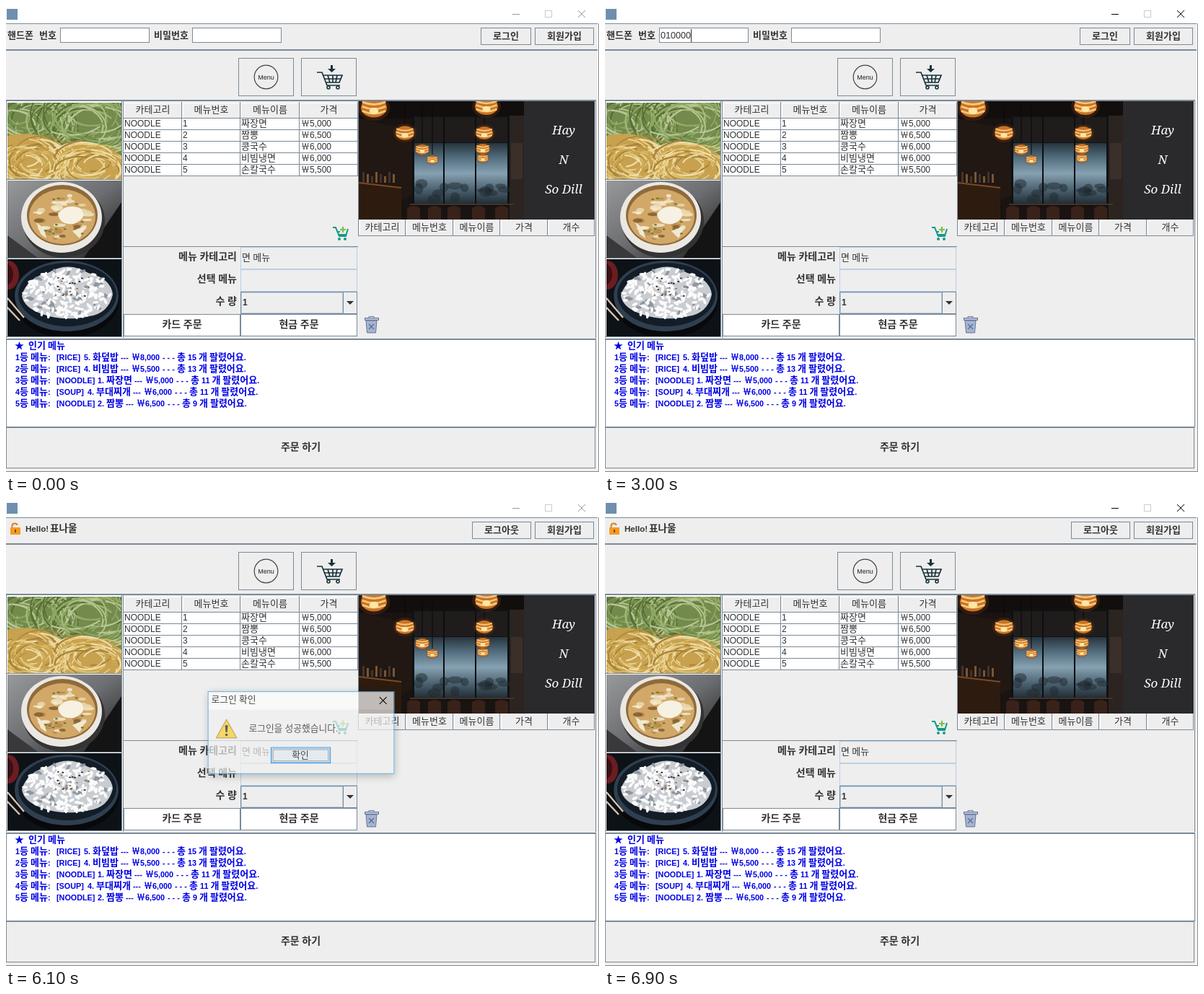
These frames come from a looping animation (822 px wide and 646 px high, 8000 ms). An HTML page:

```html
<!DOCTYPE html>
<html lang="ko">
<head>
<meta charset="utf-8">
<title>Order window</title>
<style>
html, body { margin: 0; width: 100%; height: 100%; overflow: hidden; background: #eee; }
svg { display: block; width: 822px; height: 646px; }
text { font-family: "Liberation Sans", "Noto Sans CJK KR", "Noto Sans CJK", sans-serif; white-space: pre; }
.ko { font-family: "Noto Sans CJK KR", "Noto Sans CJK", sans-serif; }
.script { font: italic 17px "Noto Serif", serif; fill: #fff; text-anchor: middle; }
</style>
</head>
<body>
<svg id="stage" viewBox="0 0 822 646" xmlns="http://www.w3.org/2000/svg"></svg>
<script>
const EDGE = '#7a8a99', INK = '#333', LOOP = 8000;
const PHONE = '01000002746', USER = '표나울';

let seed = 7;
const rnd = (a = 0, b = 1) => {
  seed = (seed * 16807) % 2147483647;
  return a + (b - a) * seed / 2147483647;
};
const pick = list => list[Math.floor(rnd(0, list.length))];
const many = (n, f) => Array.from({ length: n }, (_, i) => f(i)).join('');

// Rectangle given by its outer pixel edges
function box(x, y, x2, y2, fill = '#eee', stroke = '') {
  const o = stroke ? 0.5 : 0;
  return `<rect x="${x + o}" y="${y + o}" width="${x2 - x - 2 * o}" height="${y2 - y - 2 * o}" fill="${fill}"${stroke ? ` stroke="${stroke}"` : ''}/>`;
}
const oval = (x, y, rx, ry, fill, more = '') =>
  `<ellipse cx="${x}" cy="${y}" rx="${rx}" ry="${ry}" fill="${fill}" ${more}/>`;
const path = (d, fill, stroke = 'none', w = 1, more = '') =>
  `<path d="${d}" fill="${fill}" stroke="${stroke}" stroke-width="${w}" ${more}/>`;
const line = (d, stroke, w = 1, more = '') => path(d, 'none', stroke, w, more);
const clip = (id, x, y, x2, y2, body) =>
  `<clipPath id="${id}">${box(x, y, x2, y2)}</clipPath><g clip-path="url(#${id})">${body}</g>`;
const fade = (id, x2, y2, ...colors) =>
  `<linearGradient id="${id}" x2="${x2}" y2="${y2}">` +
  colors.map((c, i) => `<stop offset="${i / (colors.length - 1)}" stop-color="${c}"/>`).join('') + `</linearGradient>`;

// Hangul runs get their own size; Latin runs are a little smaller
function label(x, y, str, { size = 13, latin = size - 1, bold = false, fill = INK, at = 'start' } = {}) {
  const runs = str.replace(/[가-힣￦★]+/g, s => `<tspan class="ko" font-size="${s === '￦' ? 12 : size}">${s}</tspan>`);
  return `<text x="${x}" y="${y}" font-size="${latin}" fill="${fill}" text-anchor="${at}"${bold ? ' font-weight="700"' : ''}>${runs}</text>`;
}
const button = (x, y, x2, y2, str, size = 13, fill = '#eee') =>
  box(x, y, x2, y2, fill, EDGE) +
  label((x + x2) / 2, Math.floor((y + y2) / 2) + 4, str, { size, bold: true, at: 'middle' });

function heads(xs, y, y2, names) {
  return names.map((n, i) =>
    box(xs[i], y, xs[i + 1], y2) +
    line(`M${xs[i] + 1.5} ${y2 - 1}V${y + 1.5}H${xs[i + 1] - 1}`, '#fff') +
    line(`M${xs[i]} ${y2 - .5}H${xs[i + 1] - .5}V${y}`, EDGE) +
    label((xs[i] + xs[i + 1]) / 2, Math.floor((y + y2) / 2) + 4, n, { at: 'middle' })).join('');
}

function noodles() {
  // Loose strands: arcs of ellipses whose centres wander around the nest
  const nest = (cx, cy, rx, ry, n, colors) => many(n, () => {
    const k = rnd(.45, 1.1), a = rnd(0, 6.3), b = a + rnd(.9, 2);
    const x = cx + rnd(-.35, .35) * rx, y = cy + rnd(-.35, .35) * ry;
    const p = t => `${(x + rx * k * Math.cos(t)).toFixed(1)} ${(y + ry * k * Math.sin(t)).toFixed(1)}`;
    return line(`M${p(a)}A${(rx * k).toFixed(1)} ${(ry * k).toFixed(1)} 0 0 1 ${p(b)}`, pick(colors), rnd(1.3, 2.4).toFixed(1));
  });
  const green = ['#8fa864', '#a9bb7c', '#768f4c', '#566f36', '#b9c795'];
  const yellow = ['#dcbd68', '#ead291', '#c9a44e', '#f0de a6'.replace(' ', ''), '#a98439'];
  return box(2, 134, 160, 240, '#738a4c') +
    nest(28, 156, 60, 42, 90, green) + nest(112, 160, 76, 50, 130, green) +
    path('M2 180C26 174 58 178 76 194C100 182 140 190 160 208V240H2Z', '#c7a14f') +
    clip('dough', 2, 178, 160, 240, nest(36, 216, 46, 30, 80, yellow) + nest(118, 224, 48, 28, 80, yellow));
}

function soup() {
  return fade('slab', 1, 1, '#98999b', '#6c6d70', '#1a1a1b') + box(2, 242, 160, 349, 'url(#slab)') +
    path('M160 272L108 349H160Z', '#141414') + path('M2 318L44 349H2Z', '#39393b') +
    oval(80, 298, 57, 51, '#333334') + oval(77, 293, 56, 49, '#ebe8e3') +
    oval(78, 290, 49, 42, '#8f6a3a') + oval(78, 292, 46, 38, '#d2a868') +
    many(46, () => {
      const a = rnd(0, 6.3), d = Math.sqrt(rnd(0, .85));
      return oval(78 + 40 * d * Math.cos(a), 292 + 33 * d * Math.sin(a), rnd(3, 9), rnd(1.5, 4),
        pick(['#f3e9cc', '#eadbb2', '#b98a4c', '#805a30', '#f6efdc']), 'opacity=".85"');
    }) +
    path('M72 288Q84 272 104 281Q114 294 94 302Q74 304 72 288Z', '#f7f1e3') +
    path('M42 300Q54 307 56 322L48 316ZM92 312L112 304L102 322Z', '#f1e8d0') +
    many(12, () => oval(rnd(50, 108), rnd(266, 318), 2, 1.3, '#6d7d30'));
}

function rice() {
  return box(2, 351, 160, 458, '#0d1217') +
    oval(3, 373, 15, 20, '#6b1d22') + oval(0, 372, 10, 15, '#391013') +
    oval(84, 407, 73, 53, '#07090c') + oval(84, 402, 72, 49, '#2f3f50') + oval(85, 400, 68, 44, '#131d27') +
    path('M22 401Q30 376 58 370Q86 353 114 370Q146 378 148 400Q142 426 116 430Q80 438 50 427Q24 418 22 401Z', '#c9ccd1') +
    many(200, () => {
      const a = rnd(0, 6.3), d = Math.sqrt(rnd());
      const x = (85 + 60 * d * Math.cos(a)).toFixed(1), y = (399 + 34 * d * Math.sin(a)).toFixed(1);
      return oval(x, y, 4, 1.9, rnd() < .84 ? '#fbfbfb' : '#8f969f', `transform="rotate(${rnd(0, 180).toFixed()} ${x} ${y})"`);
    }) +
    many(20, () => oval(rnd(68, 118), rnd(373, 402), 1.5, .9, pick(['#9a6935', '#2a2420']))) +
    line('M2 405L25 432M2 418L19 436', '#d9c3ad', 2.4);
}

function cafe() {
  const lamp = (x, y, r) => oval(x, y, r * 1.25, r, '#8a3f0c', 'opacity=".25"') +
    oval(x, y, r, r * .75, '#c87428') +
    [-.45, -.1, .25].map(k => line(`M${x - r * .9} ${y + k * r}Q${x} ${y + k * r + r * .4} ${x + r * .9} ${y + k * r}`, '#f9c778', r * .16)).join('') +
    oval(x, y + r * .25, r * .35, r * .25, '#ffe6a5');
  const seat = x => path(`M${x} 296V280Q${x + 9} 274 ${x + 18} 280V296Z`, '#38221a');
  return fade('glass', 0, 1, '#26343d', '#546f80', '#86a1b1', '#4f6675', '#222d35') +
    box(489, 132, 718, 296, '#191312') + box(489, 132, 718, 156, '#120e0d') +
    path('M489 156L564 172V262L489 296Z', '#211713') +
    box(563, 152, 698, 278, '#0e1215') + box(566, 190, 695, 274, 'url(#glass)') +
    many(14, () => oval(rnd(570, 692), rnd(246, 268), rnd(5, 12), rnd(3, 8), '#1d272e', 'opacity=".5"')) +
    box(566, 154, 695, 189, '#1f1c1b') + box(606, 154, 608, 276, '#0d0e10') + box(650, 154, 652, 276, '#0d0e10') +
    box(698, 152, 718, 296, '#2b2421') + box(700, 190, 716, 240, '#3a2f29') +
    path('M489 244L548 252V296H489Z', '#2e1b10') + line('M489 245L548 252', '#7a4a24', 2) +
    many(8, i => box(494 + i * 6, 230 + i % 3 * 3, 497 + i * 6, 245, i % 2 ? '#7a5533' : '#43342a')) +
    [556, 585, 612, 646, 678].map(seat).join('') + line('M560 275H704', '#4a3120', 2) +
    line('M553 132V166M577 132V190M591 132V206M663 132V166M661 180V210', '#0a0808') +
    lamp(510, 141, 18) + lamp(666, 139, 16) + lamp(553, 176, 13) + lamp(663, 176, 12) +
    lamp(577, 199, 9.5) + lamp(591, 213, 7.5) + lamp(661, 198, 9.5) + lamp(661, 211, 7.5) +
    box(718, 132, 816, 296, '#2a292b') +
    [['Hay', 178], ['N', 219], ['So Dill', 260]].map(([s, y]) => `<text class="script" x="773" y="${y}">${s}</text>`).join('');
}

function icons() {
  const teal = '#18333a', green = '#159a88';
  return oval(360.5, 98.5, 16.3, 16.3, 'none', 'stroke="#444" stroke-width="1.2"') +
    `<text x="360.5" y="102" font-size="9" fill="#222" text-anchor="middle">Menu</text>` +
    line('M431 92H438L445 110H463M439 96H466L462 106H444M441 101H464M446 96L449 106M453 96V106M459 96L457 106', teal, 1.7) +
    oval(447, 113, 2, 2, 'none', `stroke="${teal}" stroke-width="1.6"`) +
    oval(460, 113, 2, 2, 'none', `stroke="${teal}" stroke-width="1.6"`) +
    path('M450 82H453V87H457L451.5 92L446 87H450Z', teal) +
    line('M453 307H457L462 319H471L474 309M459 313H463M460 317H471', green, 2) +
    oval(462, 323, 2, 2, green) + oval(470, 323, 2, 2, green) +
    line('M467 306V314M463 310H471', '#7cc142', 2.2) +
    path('M499 436H514L512.5 453H500.5Z', '#a7b4cf', '#66759a') +
    box(497, 432, 517, 436, '#b8c3d9', '#66759a') + line('M503 432V430.5H510V432', '#66759a') +
    line('M503 441L510 448M510 441L503 448', '#53719f', 1.4);
}

function table() {
  const xs = [163, 244, 325, 407, 488];
  const rows = [['짜장면', '5,000'], ['짬뽕', '6,500'], ['콩국수', '6,000'], ['비빔냉면', '6,000'], ['손칼국수', '5,500']];
  return box(162, 155, 488, 236, '#fff') +
    heads(xs, 133, 156, ['카테고리', '메뉴번호', '메뉴이름', '가격']) +
    rows.map(([name, cost], i) => {
      const y = 167 + i * 16;
      return label(164, y, 'NOODLE') + label(245, y, `${i + 1}`) + label(326, y, name) +
        label(409, y, '￦' + cost) + line(`M163 ${y + 4.5}H488`, EDGE);
    }).join('') + line('M162.5 133V236M243.5 155V236M324.5 155V236M406.5 155V236M487.5 133V236', EDGE);
}

function form() {
  const tag = (y, s) => label(320, y, s, { size: 14, bold: true, at: 'end' });
  return line('M162 333.5H488M162.5 132V460', EDGE) +
    tag(352, '메뉴 카테고리') + tag(383, '선택 메뉴') + tag(414, '수 량') +
    box(325, 334, 487, 365, '#eee', '#b8cfe5') + box(325, 365, 487, 396, '#eee', '#b8cfe5') +
    label(327, 353, '면 메뉴') +
    box(325, 396, 487, 427, '#eee', EDGE) + box(326, 397, 467, 426, 'none', '#b8cfe5') + box(467, 396, 487, 427, '#eee', EDGE) +
    path('M472 409H482L477 414Z', INK) + label(328, 415, '1', { bold: true }) +
    button(163, 427, 325, 458, '카드 주문', 14, '#fff') + button(325, 427, 487, 458, '현금 주문', 14, '#fff');
}

function ranking() {
  const style = { size: 13, latin: 10.8, bold: true, fill: '#0000e6' };
  const rows = [['RICE', 108, '5', '화덮밥', '8,000', 15], ['RICE', 108, '4', '비빔밥', '5,500', 13],
    ['NOODLE', 127, '1', '짜장면', '5,000', 11], ['SOUP', 113, '4', '부대찌개', '6,000', 11], ['NOODLE', 127, '2', '짬뽕', '6,500', 9]];
  return box(0, 462, 818, 584, '#fff', EDGE) +
    label(12, 475, '★', style) + label(31, 475, '인기 메뉴', style) +
    rows.map(([kind, x, no, name, cost, sold], i) => {
      const y = 491 + i * 16, end = x + 15 + 12 * name.length;
      return [[13, `${i + 1}등 메뉴:`], [70, `[${kind}]`], [x, `${no}. ${name}`], [end, '---'], [end + 15, '￦' + cost],
        [end + 58, '- - -'], [end + 78, `총 ${sold} 개 팔렸어요.`]].map(([px, s]) => label(px, y, s, style)).join('');
    }).join('');
}

function dialog() {
  return `<g id="dialog">` + `<rect x="279" y="267" width="262" height="117" fill="#000" opacity=".35" filter="url(#soft)"/>` +
    box(277, 264, 541, 381, '#f0f0f0') + box(278, 265, 540, 290, '#fff') + box(277, 264, 541, 381, 'none', '#2a94dc') +
    label(282, 280, '로그인 확인', { fill: '#000' }) + line('M520 272L530 282M530 272L520 282', '#000', 1.1) +
    path('M303.5 304L318 330H289Z', '#f9cf2b', '#b99a3c', 1.5, 'stroke-linejoin="round"') +
    path('M301.5 312H305.5L304.6 322H302.4Z', '#222') + oval(303.5, 325.5, 1.8, 1.8, '#222') +
    label(335, 321, '로그인을 성공했습니다.', { fill: '#222' }) +
    `<g id="okay">${box(366, 343, 451, 366, '#e1eaf2', '#0078d7')}</g>` + box(367, 344, 450, 365, 'none', '#5aa9e6') +
    `<rect x="369.5" y="346.5" width="78" height="16" fill="none" stroke="#222" stroke-dasharray="1 1"/>` +
    label(408, 359, '확인', { fill: '#000', at: 'middle' }) + `</g>`;
}

const field = x => box(x, 30, x + 124, 51, '#fff', EDGE);

document.getElementById('stage').innerHTML =
  `<filter id="soft" x="-20%" y="-20%" width="140%" height="150%"><feGaussianBlur stdDeviation="6"/></filter>` +
  box(0, 0, 822, 646) + box(0, 0, 822, 24, '#fff') + box(1, 4, 16, 19, '#6f8fae') +
  `<g id="frame" stroke="#000" fill="none"><path d="M702 11.5H712M793 6L803 16M803 6L793 16"/></g>` +
  box(747, 6, 757, 16, 'none', '#ccc') +
  line('M0 24.5H820M0 60.5H820M0 61.5H820M0 130.5H818M0 131.5H818M0 461.5H818M817.5 132V460', EDGE) +
  box(820, 24, 821, 645, '#fff') + line('M821.5 24V645M0 645.5H822', '#888') +
  `<g id="login">` +
    label(2, 45, '핸드폰', { bold: true }) + label(46, 45, '번호', { bold: true }) + field(75) +
    label(205, 45, '비밀번호', { bold: true }) + field(258) +
    `<text id="phone" x="77" y="45" font-size="12.6" fill="${INK}"></text>` +
    `<g id="dots">${many(4, i => oval(263 + 6 * i, 41, 1.9, 1.9, INK))}</g>` +
    `<rect id="caret" y="32" width="1" height="18" fill="${INK}"/>` +
    button(658, 30, 728, 54, '로그인') + `<g id="hover">${box(659, 31, 727, 53, 'none', '#9fbfdf')}${box(660, 32, 726, 52, 'none', '#b8cfe5')}</g>` +
  `</g><g id="hello">` +
    line('M8.5 40V36Q8.5 32.5 12 32.5T15.5 35', '#d8801c', 2) + box(6, 38, 20, 48, '#f59a23') + box(12, 41, 14, 45, '#7a4a10') +
    label(27, 44, 'Hello!', { latin: 11.6, bold: true }) + label(61, 44, USER, { size: 13.6, bold: true }) +
    button(646, 30, 728, 54, '로그아웃') +
  `</g>` + button(733, 30, 815, 54, '회원가입') +
  box(322, 72, 399, 125, '#eee', EDGE) + box(409, 72, 486, 125, '#eee', EDGE) +
  box(0, 132, 162, 460, '#fff') + line('M.5 132V460M160.5 132V459M0 240.5H161M0 349.5H161M0 458.5H161', EDGE) +
  clip('pic1', 2, 134, 160, 240, noodles()) + clip('pic2', 2, 242, 160, 349, soup()) + clip('pic3', 2, 351, 160, 458, rice()) +
  table() + form() + clip('pic4', 489, 132, 816, 296, cafe()) +
  heads([489, 554, 620, 685, 751, 816], 296, 319, ['카테고리', '메뉴번호', '메뉴이름', '가격', '개수']) + line('M488.5 132V319', EDGE) +
  icons() + ranking() + button(0, 584, 817, 641, '주문 하기', 14) + dialog();

const $ = id => document.getElementById(id);
const show = (id, on) => $(id).setAttribute('visibility', on ? 'visible' : 'hidden');
const count = (times, t) => times.filter(k => t >= k).length;

const KEYS = [1900, 2000, 2200, 2700, 2800, 3000, 3100, 3400, 3500, 3600, 3800];
const DOTS = [4400, 4500, 4600, 4600];
// time, opacity, scale
const FADE = [[0, 0, 1], [6100, .7, .98], [6200, .93, .995], [6300, 1, 1], [6700, .75, .985], [6800, .3, .95], [6900, 0, 1]];

function draw(now) {
  const t = now % LOOP, logged = t >= 6100;
  const typed = count(KEYS, t), dots = count(DOTS, t);
  const active = (t >= 800 && t < 6100) || t >= 6700;
  $('frame').setAttribute('stroke', active ? '#000' : '#999');
  $('phone').textContent = PHONE.slice(0, typed);
  [...$('dots').children].forEach((d, i) => d.setAttribute('opacity', i < dots ? 1 : 0));
  const blink = (t >= 1300 && t < 1700) || (t >= 5100 && t < 5600);
  $('caret').setAttribute('x', t < 4100 ? 77 + 7 * typed : 260 + 6 * dots);
  $('caret').setAttribute('opacity', t >= 800 && !blink ? 1 : 0);
  $('hover').setAttribute('opacity', t >= 5700 ? 1 : 0);
  show('login', !logged);
  show('hello', logged);

  const [, alpha, k] = FADE.filter(f => t >= f[0]).pop();
  const popup = $('dialog');
  show('dialog', alpha > 0);
  popup.setAttribute('opacity', alpha);
  popup.setAttribute('transform', `translate(${409 * (1 - k)} ${322.5 * (1 - k)}) scale(${k})`);
  $('okay').firstChild.setAttribute('fill', t >= 6500 ? '#cce4f7' : '#e1eaf2');
}

const start = performance.now();
function tick() {
  draw(performance.now() - start);
  requestAnimationFrame(tick);
}
tick();
</script>
</body>
</html>
```
